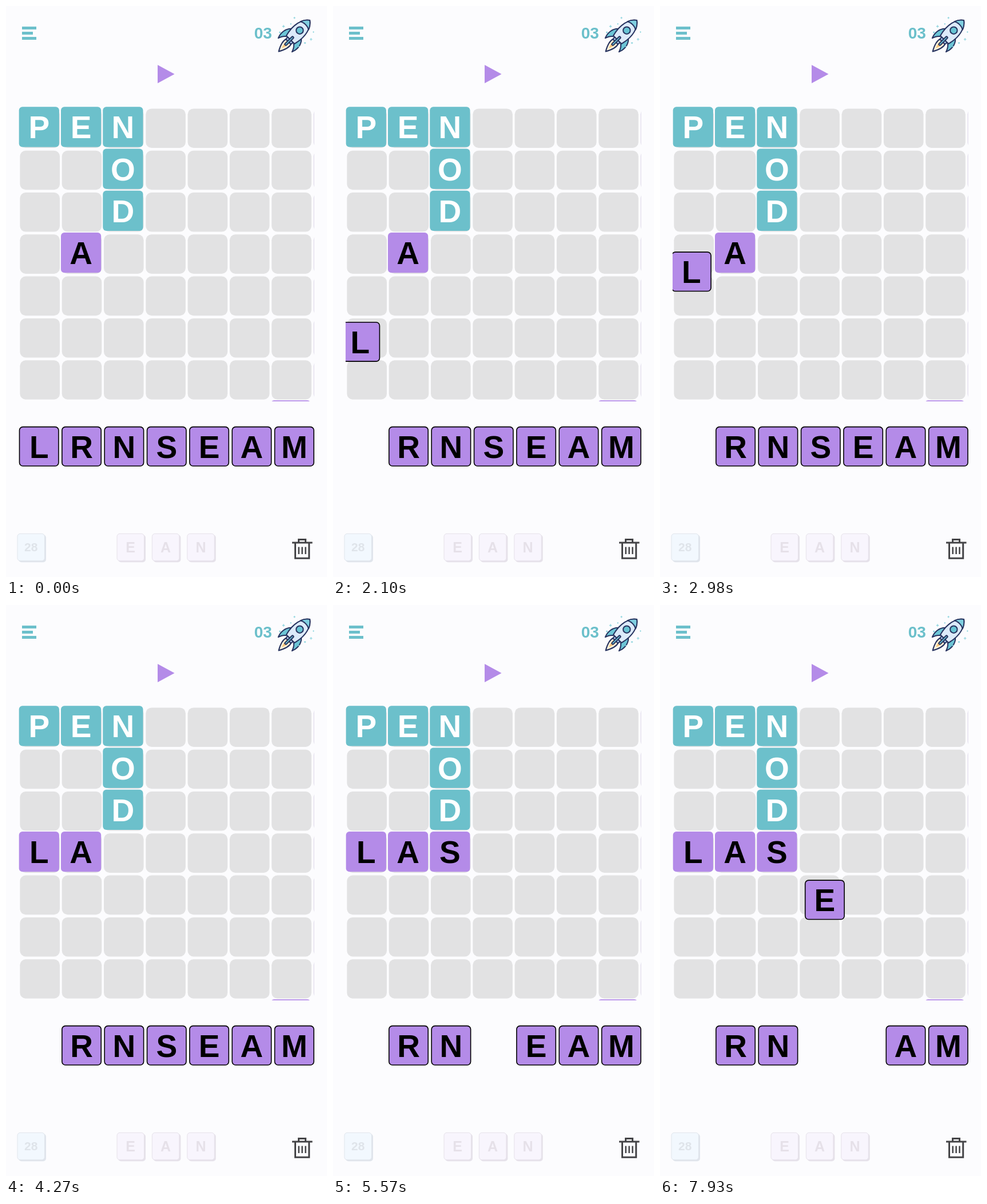
An HTML page that plays this animation: 561 by 998 pixels, repeating every 8 s.

```html
<!DOCTYPE html>
<html lang="en">
<head>
<meta charset="utf-8">
<title>Word grid</title>
<style>
  html, body { margin: 0; width: 100%; height: 100%; overflow: hidden; background: #fcfcfe; }
  svg { display: block; width: 100%; height: 100%; }
  text { font-family: "Liberation Sans", Arial, sans-serif; font-weight: bold; text-anchor: middle; }
</style>
</head>
<body>
<svg id="stage" viewBox="0 0 561 998">
  <defs>
    <clipPath id="board"><rect x="22" y="170" width="516.6" height="521"/></clipPath>
    <clipPath id="lane"><rect x="22" y="170" width="517" height="640"/></clipPath>
  </defs>

  <path d="M28 36h25v5H28zM28 45h19v5H28zM28 54h25v5H28z" fill="#6cc0cb"/>
  <text x="449.3" y="57.4" font-size="28" fill="#6cc0cb">03</text>
  <path d="M265 103L294.5 119L265 135Z" fill="#b48be8"/>

  <g transform="translate(531 25) rotate(45)">
    <g stroke="#27335f" stroke-width="2" stroke-linejoin="round">
      <path d="M-6 52C-9 60 -4 70 0 77C4 70 9 60 6 52Z" fill="#fff3dc"/>
      <path d="M-3 53Q-4 61 0 69Q4 61 3 53Z" fill="#f9c67c" stroke="none"/>
      <path d="M12 33C20 40 21 52 17 61Q14 52 9 49ZM-12 33C-20 40 -21 52 -17 61Q-14 52 -9 49Z" fill="#6cc5d6"/>
      <path d="M-7 48H7L6 53H-6Z" fill="#a9c6e8"/>
      <path d="M0 0C11 8 16 26 10 48H-10C-16 26 -11 8 0 0Z" fill="#dceafa"/>
      <path d="M0 0Q7 5 10 13Q0 8 -10 13Q-7 5 0 0Z" fill="#7fcfe0"/>
      <circle cy="25" r="6.2" fill="#67c4d4"/>
      <rect x="-1.8" y="41" width="3.6" height="20" rx="1.8" fill="#6cc5d6"/>
    </g>
    <g id="sparks" stroke="#8ad3dd" stroke-width="1.2"></g>
  </g>

  <g id="cells" clip-path="url(#board)"></g>
  <g id="fixed"></g>
  <g id="tray"></g>
  <g id="moving" clip-path="url(#lane)"></g>
  <g id="keys"></g>

  <g fill="none" stroke="#444447" stroke-width="3">
    <path d="M500 938H535.5M511.5 938V932.5H523.5V938M505.5 938V965.3H529.7V938"/>
    <path d="M511.7 945.5V958M517.6 945.5V958M523.5 945.5V958" stroke-width="2.5"/>
  </g>
</svg>
<script>
const PURPLE = '#b48be8', TEAL = '#6cc0cb';
const LOOP = 8000, PITCH = 73.3, DRAG_ROW = 3, TRAY_Y = 769.8;
const $ = id => document.getElementById(id);
const repeat = (n, make) => Array.from({ length: n }, (_, i) => make(i)).join('');

const rect = (x, y, w, h, r, fill, more = '') =>
  `<rect x="${x}" y="${y}" width="${w}" height="${h}" rx="${r}" fill="${fill}" ${more}/>`;
const label = (s, x, y, size, fill) =>
  `<text x="${x}" y="${y}" font-size="${size}" fill="${fill}">${s}</text>`;

const trayX = i => 57.7 + i * 74.35;
const boardX = col => 57.8 + col * PITCH;
const boardY = row => 211.3 + row * PITCH;

// Borderless tile lying on the board
const placed = (s, col, row, fill = PURPLE, ink = '#000') => {
  const x = boardX(col), y = boardY(row);
  return rect(x - 35.1, y - 35.1, 70.2, 70.2, 6, fill) + label(s, x, y + 19.9, 55, ink);
};
// Outlined tile centred on a point
const loose = (s, x, y) =>
  rect(x - 34.2, y - 34.2, 68.4, 68.4, 6, PURPLE, 'stroke="#000" stroke-width="1.6"') +
  label(s, x, y + 19.9, 55, '#000');
const key = (s, x, face, edge, ink, size) =>
  rect(x + 2, 924.3, 48, 48, 5, edge) +
  rect(x, 922.3, 47.5, 47.5, 5, face, `stroke="${edge}"`) +
  label(s, x + 23.7, 946 + size * 0.35, size, ink);

$('cells').innerHTML =
  repeat(7, row => repeat(8, col =>
    rect(24.4 + col * PITCH, 179.4 + row * PITCH, 69.6, 68.6, 10, col < 7 ? '#e2e2e3' : '#ddd8ea'))) +
  placed('', 6, 7);

$('fixed').innerHTML =
  repeat(3, i => placed('PEN'[i], i, 0, TEAL, '#fff')) +
  repeat(2, i => placed('OD'[i], 2, i + 1, TEAL, '#fff')) +
  placed('A', 1, DRAG_ROW);

$('tray').innerHTML = repeat(7, i => `<g>${loose('LRNSEAM'[i], trayX(i), TRAY_Y)}</g>`);

$('keys').innerHTML = key('28', 20, '#f2f8fe', '#e0e5ec', '#dfe4ea', 21) +
  repeat(3, i => key('EAN'[i], 194 + i * 61.4, '#f8f5fd', '#e6e2ea', '#e6e1e9', 25));

// Sparks alternate along both sides of the rocket
$('sparks').innerHTML = repeat(8, i => {
  const x = (i % 2 ? -1 : 1) * (19 + i % 3 * 3), y = 10 + i * 6, r = 0.8 + i % 3 * 0.4;
  return `<path d="M${x - r} ${y - r}l${2 * r} ${2 * r}M${x - r} ${y + r}l${2 * r} ${-2 * r}"/>`;
});

// A tile is lifted to a hover point, rests, then settles into its cell
const LIFT = 680, REST = 100;
const drags = [
  { letter: 'L', slot: 0, col: 0, start: 1740, hover: [41.7, 490], settle: 740 },
  { letter: 'S', slot: 3, col: 2, start: 4330, hover: [198, 485], settle: 460 },
  { letter: 'E', slot: 4, col: 3, start: 7410, hover: [277.8, 477], settle: 460 }
];

$('moving').innerHTML = drags.map(d =>
  `<g>${loose(d.letter, 0, 0)}</g><g>${placed(d.letter, d.col, DRAG_ROW)}</g>`).join('');

const clamp = u => Math.min(1, Math.max(0, u));
const easeIn = (u, p) => u ** p;
const easeOut = (u, p) => 1 - (1 - u) ** p;
const mix = (a, b, k) => a + (b - a) * k;
const show = (el, on) => { el.style.display = on ? '' : 'none'; };

function position(d, age) {
  const [hx, hy] = d.hover;
  const up = easeOut(clamp(age / LIFT), 1.4);
  const u = clamp((age - LIFT - REST) / d.settle);
  // Sideways motion leads while settling
  return [
    mix(mix(trayX(d.slot), hx, up), boardX(d.col), easeOut(u, 1.75)),
    mix(mix(TRAY_Y, hy, up), boardY(DRAG_ROW), easeIn(u, 1.75))
  ];
}

function draw(t) {
  drags.forEach((d, i) => {
    const age = t - d.start;
    const begun = age >= 0, done = age >= LIFT + REST + d.settle;
    const tile = $('moving').children[2 * i];
    show($('tray').children[d.slot], !begun);
    show(tile, begun && !done);
    show($('moving').children[2 * i + 1], done);
    tile.setAttribute('transform', `translate(${position(d, age)})`);
  });
}

const start = performance.now();
function tick() {
  draw((performance.now() - start) % LOOP);
  requestAnimationFrame(tick);
}
tick();
</script>
</body>
</html>
```
